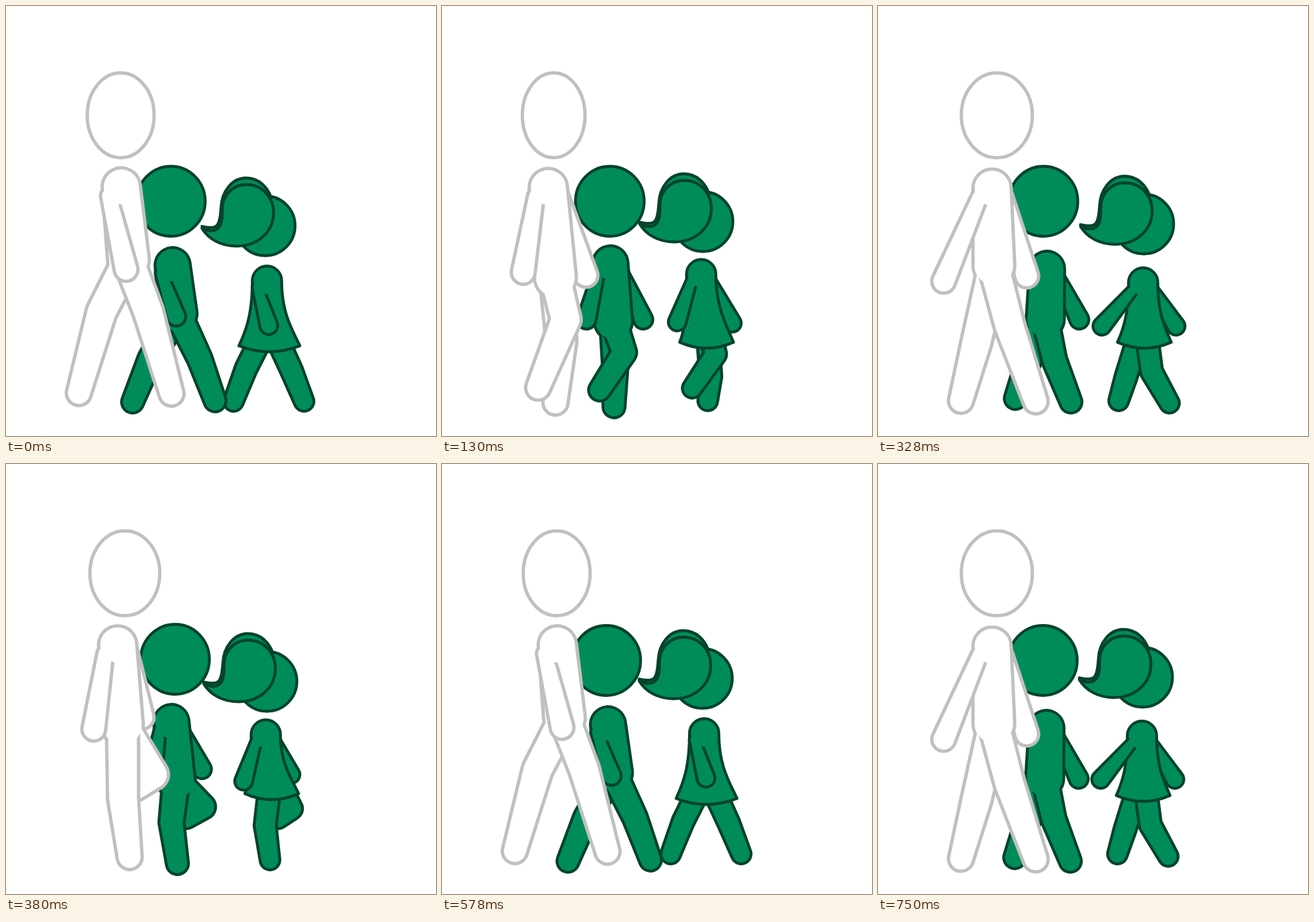
An HTML page for the animation above (0.87 s loop, 720x720 px).

```html
<!DOCTYPE html>
<html lang="en">
<head>
<meta charset="utf-8">
<title>Walking family</title>
<style>
html, body { margin: 0; width: 100%; height: 100%; overflow: hidden; background: #fff; }
svg { display: block; width: 100vw; height: 100vh; }
</style>
</head>
<body>
<svg id="stage" viewBox="0 0 720 720"></svg>
<script>
// Each figure is a puppet: joint radii plus a few joints per pose.
// leg = radius at hip, knee, foot; arm = radius at shoulder, hand.
const man = { skin: '#fff', ink: '#c0c0c0', line: 5.6, headH: 71, neck: 32, hip: 35, leg: [27, 26, 21], arm: [14, 20] };
const boy = { skin: '#008c59', ink: '#04432c', line: 4.8, headH: 58.5, neck: 29.5, hip: 32, leg: [23, 21, 18.5], arm: [10, 16] };
const girl = { ...boy, headH: 50, neck: 24.5, leg: [19, 18.5, 16.5], arm: [9, 15], skirt: true };

// Joints in this order; "-" is a hidden hand. The skirt hangs at the hip joint.
const JOINTS = ['head', 'neck', 'hip', 'hand', 'farHand', 'knee', 'foot', 'farKnee', 'farFoot'];
const poses = {
  stride: {
    man: '192,183 193,303 205,425 201,441 - 238,512 277,649 160,512 122,648',
    boy: '276,327 279,434 288,515 285,520 - 324,590 350,661 242,590 212,663',
    girl: '434,368 437,460 441,569 440,535 - 478,610 499,662 402,607 381,662'
  },
  cross: {
    man: '187,183 178,304 190,455 136,446 241,451 207,525 161,639 200,560 190,664',
    boy: '281,327 282,431 287,528 242,525 337,525 305,580 264,643 290,610 288,671',
    girl: '437,361 434,449 443,563 394,529 486,531 458,583 419,640 450,620 445,661'
  },
  step: {
    man: '199,183 191,305 194,435 110,461 249,452 220,535 264,662 165,562 139,661',
    boy: '277,327 283,440 280,525 - 337,525 295,592 323,663 250,600 230,657',
    girl: '445,365 444,463 446,563 375,536 499,536 458,612 488,665 415,622 403,661'
  },
  lift: {
    man: '199,183 187,303 195,438 147,444 228,424 196,560 207,658 246,520 218,543',
    boy: '283,327 277,432 285,530 246,515 328,511 277,600 287,669 330,574 302,592',
    girl: '437,364 435,453 445,552 398,531 477,520 434,605 442,663 478,577 456,594'
  }
};
const manHeadW = { stride: 56, cross: 52.5, step: 59.5, lift: 58.5 };

// Pose, duration, and how far the boy and the girl have drifted.
const beats = [
  ['stride', 130, '0,0', '0,0'],
  ['cross', 120, '0,0', '0,0'],
  ['step', 130, '0,0', '0,0'],
  ['lift', 120, '0,0', '0,0'],
  ['stride', 130, '-1,2', '2,-9'],
  ['cross', 120, '-1,2', '2,-3'],
  ['step', 120, '-1,2', '-2,-8']
];
const LOOP = beats.reduce((sum, b) => sum + b[1], 0);

// Hair around the centre of the girl's head.
const hair = [
  'M-106 1C-80 7 -76 2 -74 -30C-73 -58 -55 -80 -32 -80C-10 -80 4 -64 10 -47L-32 -20L-85 15Z',
  'M-106 4C-80 16 -71 2 -72 -25C-73 -50 -55 -69 -32 -69C-5 -69 14 -48 14 -22C14 10 -12 34 -48 34C-75 34 -95 22 -106 4Z'
];

const circle = (p, r) => ({ x: p.x, y: p.y, r });

// Outline around two circles, both grown by g.
function hull(p, q, g) {
  const turn = Math.atan2(q.y - p.y, q.x - p.x);
  const spread = Math.acos((p.r - q.r) / Math.hypot(q.x - p.x, q.y - p.y));
  const edge = (c, side) => {
    const a = turn + side * spread, r = c.r + g;
    return `${c.x + r * Math.cos(a)} ${c.y + r * Math.sin(a)}`;
  };
  const arc = (c, side, big) => `A${c.r + g} ${c.r + g} 0 ${+big} 0 ${edge(c, side)}`;
  const wide = spread > Math.PI / 2;
  return `M${edge(p, 1)}L${edge(q, 1)}${arc(q, -1, wide)}L${edge(p, -1)}${arc(p, 1, !wide)}Z`;
}

function limb(look, chain) {
  const layer = (g, color) => {
    const d = chain.slice(1).map((c, i) => hull(chain[i], c, g)).join('');
    return `<path fill="${color}" d="${d}"/>`;
  };
  return layer(look.line / 2, look.ink) + layer(-look.line / 2, look.skin);
}

const inked = look => `fill="${look.skin}" stroke="${look.ink}" stroke-width="${look.line}" stroke-linejoin="round"`;

// Hides the limb's line inside the body, so that the two grow together.
const blend = (look, c) =>
  `<circle cx="${c.x}" cy="${c.y}" r="${c.r - look.line / 2}" fill="${look.skin}"/>`;

function dress(look, neck, hem) {
  const { x, y, r } = neck, w = hem.r, h = hem.y - y;
  const side = s => `${x + s * r} ${y + h * 0.5} ${hem.x + s * w * 0.75} ${hem.y - h * 0.25}`;
  const back = `${hem.x - w * 0.75} ${hem.y - h * 0.25} ${x - r} ${y + h * 0.5}`;
  return `<path ${inked(look)} d="M${hem.x - w} ${hem.y}C${back} ${x - r} ${y}` +
    `A${r} ${r} 0 0 1 ${x + r} ${y}C${side(1)} ${hem.x + w} ${hem.y}Q${hem.x} ${hem.y + 20} ${hem.x - w} ${hem.y}Z"/>`;
}

function figure(look, text, headW, shift) {
  const j = {};
  text.split(' ').forEach((s, i) => {
    const [x, y] = s.split(',').map(Number);
    j[JOINTS[i]] = s === '-' ? null : { x, y };
  });
  const neck = circle(j.neck, look.neck);
  const hip = circle(look.skirt ? { x: j.hip.x, y: j.hip.y - 40 } : j.hip, look.hip);
  const arm = (hand, side) => {
    if (!hand) return '';
    const shoulder = { x: neck.x + side * neck.r * 0.65, y: neck.y + neck.r * 0.45 };
    return limb(look, [circle(shoulder, look.arm[0]), circle(hand, look.arm[1])]);
  };
  const leg = (knee, foot) =>
    limb(look, [hip, knee, foot].map((p, i) => circle(p, look.leg[i])));
  const legs = [leg(j.farKnee, j.farFoot), leg(j.knee, j.foot)];
  const body = look.skirt
    ? legs.join('') + arm(j.farHand, 1) + dress(look, neck, circle(j.hip, j.farHand ? 45 : 51))
    : arm(j.farHand, 1) + limb(look, [neck, hip]) + legs.map(l => l + blend(look, hip)).join('');
  const head = `<ellipse ${inked(look)} cx="${j.head.x}" cy="${j.head.y}" rx="${headW}" ry="${look.headH}"/>`;
  const locks = look.skirt
    ? `<g transform="translate(${j.head.x},${j.head.y})">` + hair.map(d => `<path ${inked(look)} d="${d}"/>`).join('') + '</g>'
    : '';
  return `<g transform="translate(${shift})">${body}${arm(j.hand, -1)}${blend(look, neck)}${head}${locks}</g>`;
}

function scene([name, , boyShift, girlShift]) {
  const pose = poses[name];
  return figure(girl, pose.girl, girl.headH, girlShift) +
    figure(boy, pose.boy, boy.headH - 1, boyShift) +
    figure(man, pose.man, manHeadW[name], '0,0');
}

const stage = document.getElementById('stage');
stage.innerHTML = beats.map(b => `<g display="none">${scene(b)}</g>`).join('');
const scenes = [...stage.children];

function draw(ms) {
  let left = ms % LOOP, now = 0;
  while (left >= beats[now][1]) left -= beats[now++][1];
  scenes.forEach((g, i) => g.setAttribute('display', i === now ? 'inline' : 'none'));
}

const start = performance.now();
function tick() {
  draw(performance.now() - start);
  requestAnimationFrame(tick);
}
draw(0);
requestAnimationFrame(tick);
</script>
</body>
</html>
```
